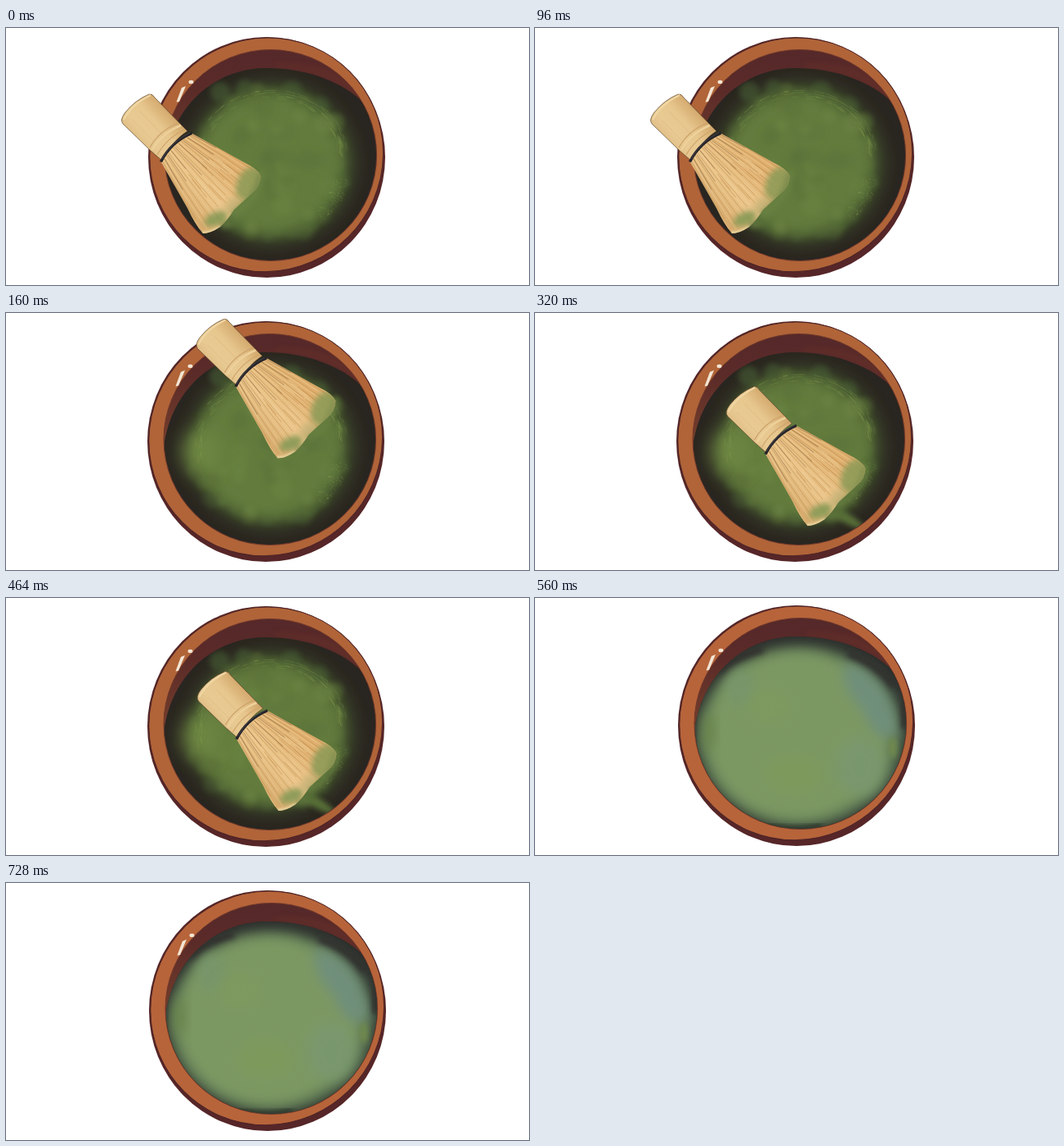
An HTML page that plays this animation: 640x314 px, repeating every 840 ms.

```html
<!DOCTYPE html>
<html lang="en">
<head>
<meta charset="utf-8">
<title>Whisking matcha</title>
<style>
  html, body { margin: 0; width: 100%; height: 100%; overflow: hidden; background: #fff; }
  svg { display: block; width: 100vw; height: 100vh; }
</style>
</head>
<body>
<svg viewBox="0 0 640 314" fill="none">
  <defs>
    <clipPath id="inner"><ellipse cx="323.8" cy="155.5" rx="129.3" ry="128.5"/></clipPath>
    <clipPath id="well"><path d="M193 176C198 97 255 49 318 49C370 49 415 67 440 94H470V300H190Z"/></clipPath>
    <clipPath id="bristleClip"><path id="fanClip"/></clipPath>
    <linearGradient id="wall" x1="0" y1="0" x2="0" y2="1">
      <stop offset="0" stop-color="#55282a"/><stop offset=".2" stop-color="#5b2b28"/>
      <stop offset=".55" stop-color="#77402c"/>
    </linearGradient>
    <linearGradient id="handle" gradientUnits="userSpaceOnUse" x1="150" y1="126" x2="190" y2="90">
      <stop offset="0" stop-color="#e0bf86"/><stop offset=".25" stop-color="#e8ca92"/>
      <stop offset=".6" stop-color="#e7c78e"/><stop offset="1" stop-color="#d2a76b"/>
    </linearGradient>
    <linearGradient id="fan" gradientUnits="userSpaceOnUse" x1="205" y1="205" x2="262" y2="150">
      <stop offset="0" stop-color="#d8ac6e"/><stop offset=".4" stop-color="#ebc68c"/>
      <stop offset="1" stop-color="#dfaf6e"/>
    </linearGradient>
    <filter id="b1" x="-30%" y="-30%" width="160%" height="160%"><feGaussianBlur stdDeviation="1.2"/></filter>
    <filter id="b3" x="-40%" y="-40%" width="180%" height="180%"><feGaussianBlur stdDeviation="3"/></filter>
    <filter id="b8" x="-50%" y="-50%" width="200%" height="200%"><feGaussianBlur stdDeviation="8"/></filter>
    <filter id="b12" x="-60%" y="-60%" width="220%" height="220%"><feGaussianBlur stdDeviation="12"/></filter>
  </defs>

  <g id="bowl">
    <ellipse cx="319" cy="158" rx="145" ry="147" fill="#562628"/>
    <ellipse id="rim" cx="318.7" cy="154.9" rx="144" ry="141.7" transform="rotate(-45 318.7 154.9)" stroke="#4d2326" stroke-width="1"/>
    <ellipse cx="323.8" cy="155.5" rx="129.8" ry="129" fill="url(#wall)" stroke="#70382a" stroke-width="1"/>
    <g clip-path="url(#inner)">
      <path d="M330 49C370 49 410 63 440 94L447 89C420 57 385 43 330 43Z" fill="#6d342b" opacity=".4" filter="url(#b3)"/>
      <g clip-path="url(#well)">
        <rect x="180" y="40" width="290" height="260" fill="#292520"/>
        <g id="powder">
          <ellipse cx="325" cy="165" rx="97" ry="94" fill="#4c6132" filter="url(#b12)"/>
          <g id="puffs" filter="url(#b3)"></g>
          <ellipse cx="323" cy="166" rx="87" ry="84" fill="#637c3e" filter="url(#b8)"/>
          <ellipse id="glow" cx="240" cy="171" rx="22" ry="26" fill="#6e8843" filter="url(#b12)"/>
          <g id="mottle" filter="url(#b3)"></g>
          <g id="flecks" stroke-linecap="round" stroke-width="1"></g>
          <path id="drip" d="M360 240Q385 238 409 268Q384 262 360 246Z" fill="#586f38" filter="url(#b3)"/>
        </g>
        <g id="tea">
          <rect x="180" y="40" width="290" height="260" fill="#2e312e"/>
          <ellipse cx="324" cy="172" rx="126" ry="109" fill="#566f51" filter="url(#b8)"/>
          <ellipse cx="320" cy="170" rx="113" ry="104" fill="#7c9862" filter="url(#b8)"/>
          <path d="M376 82C408 86 436 112 443 166C428 183 410 168 402 142C390 126 375 116 376 82Z" fill="#6f8f7c" filter="url(#b8)"/>
          <ellipse cx="397" cy="208" rx="30" ry="36" fill="#79976d" filter="url(#b8)"/>
          <ellipse cx="250" cy="112" rx="17" ry="23" fill="#77956a" filter="url(#b8)"/>
          <ellipse cx="285" cy="134" rx="24" ry="20" fill="#7e9a5e" filter="url(#b8)"/>
          <ellipse cx="316" cy="217" rx="34" ry="22" fill="#7d9a5c" filter="url(#b8)"/>
          <ellipse cx="212" cy="166" rx="7" ry="24" fill="#67834a" filter="url(#b8)"/>
          <ellipse cx="437" cy="185" rx="5" ry="13" fill="#6f894e" filter="url(#b3)"/>
          <path d="M224 92Q244 72 278 65M382 70Q420 83 438 110M451 128V162" stroke="#30322f" stroke-width="8" filter="url(#b3)"/>
          <path d="M278 279Q318 288 350 279" stroke="#283128" stroke-width="5" filter="url(#b3)"/>
        </g>
      </g>
    </g>
    <path d="M208.500 90.500L215 73L220 71L212 90Z" fill="#f2e5d3"/>
    <ellipse cx="226.500" cy="66" rx="3" ry="2.200" fill="#f2e5d3"/>
  </g>

  <g id="whisk">
    <path d="M143 117Q139 112 146 103Q158 88 175 81Q179 80 182 85L222 126Q204 137 191 162L177 150Z" fill="url(#handle)" stroke="#56412b" stroke-width=".7"/>
    <path d="M144 112Q154 93 177 82" stroke="#f0d7a4" stroke-width="2"/>
    <path d="M176 146Q188 125 211 116" stroke="#cba069" stroke-width="1.2"/>
    <path d="M179 149Q191 128 214 119" stroke="#eed19a" stroke-width="2.5"/>
    <path d="M185 155Q197 134 219 124" stroke="#cfa46b" stroke-width="1.2"/>
    <path d="M155 112L182 140M164 102L193 132M178 94L205 119" stroke="#d8b378" stroke-width="1" opacity=".5"/>
    <path id="fanShape" fill="url(#fan)"/>
    <g clip-path="url(#bristleClip)">
      <g id="bristles" stroke-linecap="round"></g>
      <ellipse cx="297" cy="190" rx="14" ry="22" fill="#8a9a56" opacity=".85" transform="rotate(25 297 190)" filter="url(#b3)"/>
      <ellipse cx="257" cy="233" rx="15" ry="8" fill="#879a56" opacity=".9" transform="rotate(-24 257 233)" filter="url(#b3)"/>
      <ellipse cx="278" cy="216" rx="12" ry="7" fill="#c0b074" opacity=".7" transform="rotate(-40 278 216)" filter="url(#b3)"/>
      <path d="M240 250Q250 251 263 243" stroke="#e6d29b" stroke-width="4" filter="url(#b1)"/>
    </g>
    <path d="M189.500 163.500Q202 139 227.500 128.500" stroke="#25242a" stroke-width="3.400"/>
    <path d="M191 160Q203 138 225 128" stroke="#565055" stroke-width=".7"/>
    <g id="tipMist" filter="url(#b3)">
      <path d="M312 176Q311 197 295 214L277 229" stroke="#6b8244" stroke-width="8" opacity=".8"/>
      <ellipse cx="269" cy="240" rx="8" ry="5" fill="#6b8244" opacity=".7"/>
    </g>
  </g>
</svg>
<script>
const $ = id => document.getElementById(id);
const LOOP = 840;

// Each pose holds until the next one starts.
const poses = [
  { start: 0, bowl: [0, 0], whisk: [0, 0], glow: 0, mist: 1 },
  { start: 160, bowl: [-1, -1], whisk: [91.5, -73.5], glow: 1, mist: 0.7 },
  { start: 320, bowl: [-1, -1], whisk: [92.5, 9], glow: 1, mist: 0.7, drip: true },
  { start: 560, bowl: [1, -2], tea: true }
];

let seed = 17;
function rand(lo = 0, hi = 1) {
  seed = (seed * 16807) % 2147483647;
  return lo + (hi - lo) * seed / 2147483647;
}

function add(parent, tag, attrs) {
  const el = document.createElementNS('http://www.w3.org/2000/svg', tag);
  for (const key in attrs) el.setAttribute(key, attrs[key]);
  $(parent).append(el);
}

function ring(angle, rx, ry = rx) {
  return [325 + rx * Math.cos(angle), 166 + ry * Math.sin(angle)];
}

function drawPowder() {
  for (let i = 0; i < 50; i++) {
    const [cx, cy] = ring(i / 50 * 2 * Math.PI, rand(78, 98), rand(76, 93));
    add('puffs', 'circle', { cx, cy, r: rand(6, 12), fill: i % 3 ? '#4a5f31' : '#597039', opacity: rand(0.3, 0.65) });
  }
  for (const [cx, cy, r] of [[262, 78, 12], [292, 73, 10], [350, 78, 13], [384, 96, 12]])
    add('puffs', 'circle', { cx, cy, r, fill: '#465a30', opacity: 0.6 });

  for (let i = 0; i < 36; i++) {
    const [cx, cy] = ring(rand(0, 6.28), rand(8, 82));
    add('mottle', 'circle', { cx, cy, r: rand(5, 13), fill: i % 2 ? '#6c8543' : '#5a7139', opacity: rand(0.25, 0.55) });
  }
  for (let i = 0; i < 190; i++) {
    const specks = i < 90;
    const angle = specks ? rand(0.2, 0.85) : rand(2.9, 6.1);
    const r = specks ? rand(78, 98) : rand(84, 96);
    const [x, y] = ring(angle, r, r * 0.95);
    const [x2, y2] = ring(angle + (specks ? 0.012 : rand(0.04, 0.16)), r + rand(-2, 2), r * 0.95);
    add('flecks', 'path', { d: `M${x} ${y}L${x2} ${y2}`, stroke: i % 3 ? '#748d47' : '#83994f', opacity: rand(0.2, 0.55) });
  }
}

function bezier(points, u) {
  while (points.length > 1)
    points = points.slice(1).map((p, i) => [0, 1].map(k => points[i][k] + (p[k] - points[i][k]) * u));
  return points[0];
}

const neck = [[190, 164], [203, 140], [228, 129]];
const tip = [[241, 251], [274, 247], [307, 210], [312, 181]];

function strand(u, from, to, color, width, opacity) {
  const a = bezier(neck, u), b = bezier(tip, u);
  const bend = (u - 0.5) * 5;
  const at = s => a.map((v, k) => v + (b[k] - v) * s + (k ? -bend : bend) * 4 * s * (1 - s));
  const [p, m, q] = [from, (from + to) / 2, to].map(at);
  add('bristles', 'path', { d: `M${p}Q${m} ${q}`, stroke: color, 'stroke-width': width, opacity });
}

function drawWhisk() {
  const fan = 'M190 164Q203 140 228 129L291 164Q308 172 312 181Q311 194 302 201Q291 211 279 222Q271 235 262 243Q250 251 241 251Q232 241 222 220Z';
  $('fanShape').setAttribute('d', fan);
  $('fanClip').setAttribute('d', fan);
  for (let i = 0; i <= 25; i++) {
    const u = i / 25;
    strand(u, 0, rand(0.75, 0.98), i % 2 ? '#c0904f' : '#f1d19b', 0.9, 0.65);
    if (i % 3 === 0) strand(u, 0.02, rand(0.25, 0.45), '#795433', 1, 0.5);
  }
  for (let i = 0; i < 18; i++) {
    const s = rand(0.25, 0.6);
    strand(rand(0.3, 0.85), s, s + rand(0.15, 0.3), i % 2 ? '#c48a48' : '#f0d4a0', 1, 0.6);
  }
}

function show(id, on) {
  $(id).style.display = on ? '' : 'none';
}

function render(time) {
  const t = time % LOOP;
  const pose = poses.filter(p => p.start <= t).pop();
  $('bowl').setAttribute('transform', `translate(${pose.bowl})`);
  $('rim').setAttribute('fill', pose.tea ? '#b7643a' : '#b06438');
  show('tea', pose.tea);
  show('powder', !pose.tea);
  show('whisk', pose.whisk);
  show('drip', pose.drip);
  if (pose.whisk) {
    $('whisk').setAttribute('transform', `translate(${pose.whisk})`);
    $('glow').setAttribute('opacity', pose.glow);
    $('tipMist').setAttribute('opacity', pose.mist);
  }
}

drawPowder();
drawWhisk();
const began = performance.now();
function tick() {
  render(performance.now() - began);
  requestAnimationFrame(tick);
}
tick();
</script>
</body>
</html>
```
